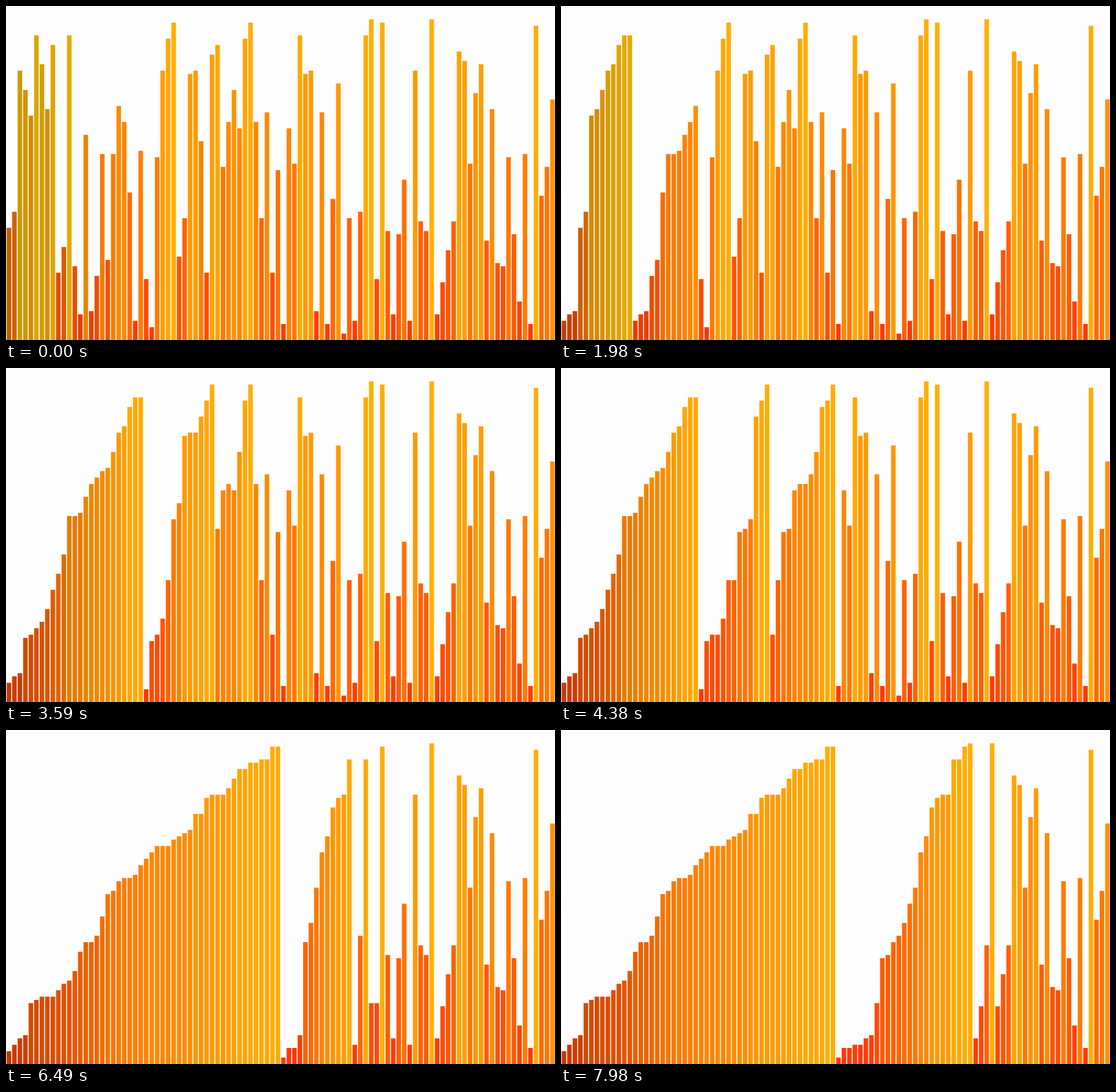
An HTML page with a canvas for the animation above (8 s loop, 959 by 584 pixels).

```html
<!DOCTYPE html>
<html>
<head>
<meta charset="utf-8">
<style>
html, body { margin: 0; width: 959px; height: 584px; overflow: hidden; background: #fdfdfd; }
canvas { display: block; }
</style>
</head>
<body>
<canvas id="stage" width="959" height="584"></canvas>
<script>
const W = 959, H = 584, LOOP = 8000, FRAME = 1000 / 30;
const ctx = document.getElementById('stage').getContext('2d');

// The unsorted input, in percent
const input = [
  35, 40, 84, 78, 70, 95, 86, 72, 92, 21, 29, 95, 23, 8, 64, 9, 20, 58, 25, 58,
  73, 68, 46, 6, 59, 19, 4, 57, 84, 94, 99, 26, 38, 83, 84, 62, 21, 89, 92, 54,
  68, 78, 66, 94, 99, 68, 38, 71, 21, 53, 5, 66, 55, 95, 83, 84, 9, 71, 5, 44,
  80, 2, 38, 6, 40, 95, 100, 19, 99, 34, 8, 33, 50, 6, 84, 37, 34, 100, 8, 18,
  28, 37, 90, 87, 55, 77, 86, 31, 72, 24, 23, 57, 33, 12, 58, 5, 98, 45, 54, 75
];

// Sorting pace: [ms, steps done], about one step per 16 ms
const pace = [[0, 3], [960, 60], [1980, 120], [3590, 221], [5140, 320], [6490, 405], [7980, 498], [8080, 504]];

// Record every write of the merge sort; each merge begins with one idle step.
const steps = [];
function mergeSort(a, lo, hi) {
  if (lo >= hi) return;
  const mid = (lo + hi) >> 1;
  mergeSort(a, lo, mid);
  mergeSort(a, mid + 1, hi);
  const left = a.slice(lo, mid + 1), right = a.slice(mid + 1, hi + 1);
  steps.push(null);
  for (let k = lo; k <= hi; k++) {
    const takeLeft = !right.length || (left.length && left[0] <= right[0]);
    a[k] = (takeLeft ? left : right).shift();
    steps.push([k, a[k]]);
  }
}
mergeSort(input.slice(), 0, input.length - 1);

function stepsAt(t) {
  const i = pace.findIndex(p => p[0] > t);
  const [t0, s0] = pace[i - 1], [t1, s1] = pace[i];
  const frames = Math.round((t1 - t0) / FRAME);
  const u = Math.floor((t - t0) / (t1 - t0) * frames) / frames;
  return Math.floor(s0 + (s1 - s0) * u);
}

function draw(t) {
  const bars = input.slice();
  for (const step of steps.slice(0, stepsAt(t))) {
    if (step) bars[step[0]] = step[1];
  }
  ctx.fillStyle = '#fdfdfd';
  ctx.fillRect(0, 0, W, H);
  bars.forEach((v, i) => {
    const height = v / 100 * H * 0.96;
    ctx.fillStyle = `rgb(${Math.min(255, 200 + i * 2.5)}, ${50 + v * 1.25}, 0)`;
    ctx.fillRect(i * W / bars.length + 1.15, H - height, 7.95, height);
  });
}

const began = performance.now();
function tick() {
  draw((performance.now() - began) % LOOP);
  requestAnimationFrame(tick);
}
tick();
</script>
</body>
</html>
```
